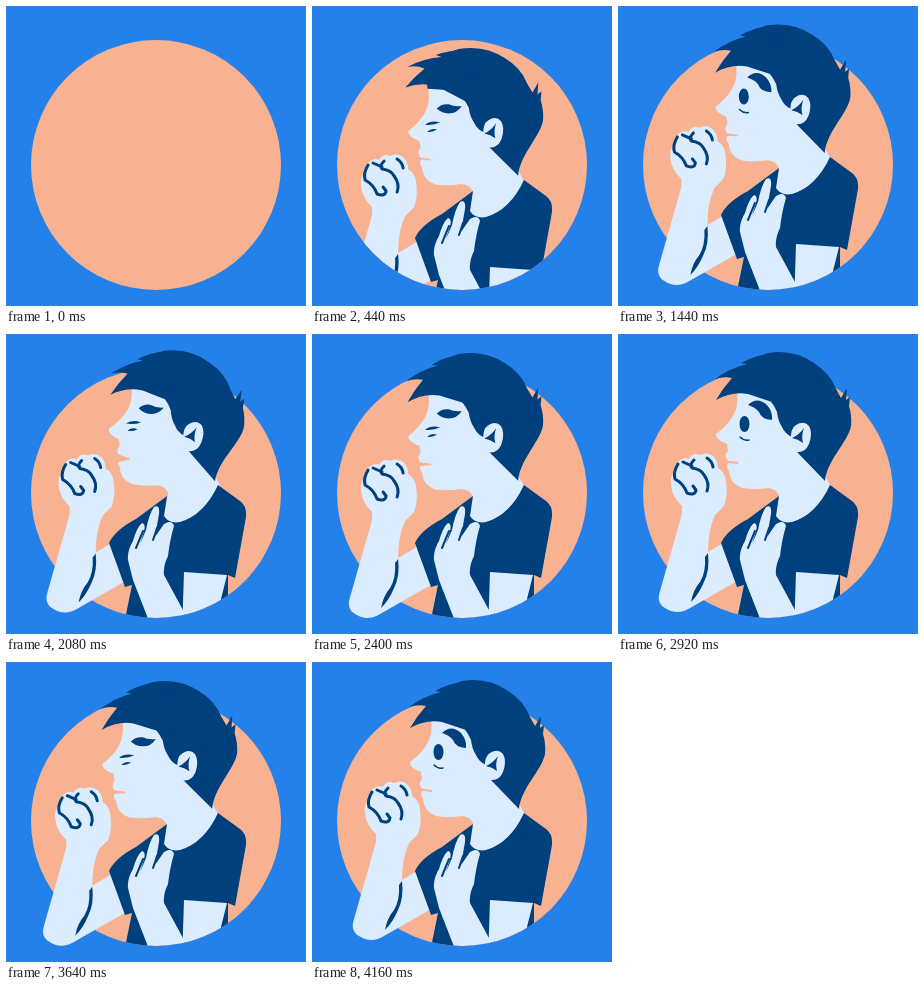
An HTML page for the animation above (4520 ms loop, 300x300 px).

```html
<!DOCTYPE html>
<html lang="en">
<head>
<meta charset="utf-8">
<title>Coughing boy</title>
<style>
  html, body { margin: 0; width: 100%; height: 100%; overflow: hidden; background: #2581ea; }
  svg { display: block; width: 100vw; height: 100vh; }
  .skin { fill: #dbecff; }
  .navy { fill: #00407d; }
  .peach { fill: #f8b292; }
  .line { fill: none; stroke: #00407d; stroke-linecap: round; stroke-linejoin: round; }
</style>
</head>
<body>
<svg viewBox="0 0 300 300">
  <defs>
    <clipPath id="disc"><path d="M0 0H300V159H275A125 125 0 0 1 25 159H0Z"/></clipPath>
    <clipPath id="armClip"><circle id="reach" cx="150" cy="159" r="125"/></clipPath>
  </defs>
  <circle class="peach" cx="150" cy="159" r="125"/>

  <g id="figure">
    <g clip-path="url(#disc)"><g class="rise">
      <g id="head">
        <path class="skin" d="M119 57Q121 72 115 82Q109 92 98 100Q98 106 109 110L110 117Q105 122 111 128Q107 132 111 137Q112 150 124 154Q137 156 150 154Q158 155 161 161L156 195H205L212 151L185 100L160 58Z"/>
        <path id="mouth" class="peach"/>
        <path d="M108 127.500L120 129" fill="none" stroke="#f8b292" stroke-width="1.800"/>
        <g id="openEye">
          <ellipse class="navy" cx="126.500" cy="90" rx="5" ry="8"/>
          <path class="navy" d="M130 71Q139 62 149 71Q155 78 154 86Q143 85 141 78Q137 73 130 71Z"/>
          <path class="line" d="M122 103Q126 107 131 106" stroke-width="1.500"/>
        </g>
        <g id="shutEye">
          <path class="navy" d="M127 78Q132 73 139 74Q145 77 152 76Q147 84 137 83Q131 82 127 78Z"/>
          <path class="navy" d="M115 94Q121 89 130 92Q123 95 115 94Z"/>
          <path class="navy" d="M117 101Q121 97 127 99Q122 102 117 101Z"/>
        </g>
        <path class="navy" d="M118 50Q121 28 150 19Q176 15 196 29Q212 39 218 55L223 64L229 54L228 66L232 63L231 72Q234 82 233 92C230 108 209 126 207 147L179 118L174 103Q167 100 164 93Q160 87 159 78Q153 64 143 60L118 58Z"/>
        <path class="skin" d="M173 108Q172 94 178 91Q186 86 191 92Q195 99 191 110Q187 119 179 118L173 115Z"/>
        <path class="navy" d="M174 104Q181 101 186 94Q183 102 185 109Q180 105 174 104Z"/>
        <path id="fringe" class="navy" d="M160 20Q140 19 123 29L129 30Q112 34 97 45Q106 42 114 44Q105 54 98 66Q114 57 130 60L160 70Z"/>
      </g>
    </g></g>

    <g clip-path="url(#armClip)"><g class="rise"><g id="arm">
      <path class="skin" d="M53 151Q52 142 56 139Q57 128 64 125Q68 123 71 125Q75 118 82 121Q90 117 96 123Q100 127 100 134Q107 138 108 147Q110 162 106 172L97 181Q90 196 90 218L112 205L128 242L72 274Q59 282 47 274Q38 269 42 257L64 180L64 172Q54 163 53 151Z"/>
      <path class="line" d="M60 130Q55 138 57 145Q66 150 69 159Q77 162 78 156L75 152M76 126Q71 131 74 134Q83 135 86 141Q92 149 89 157M89 124Q94 127 95 133M65 128L74 132" stroke-width="3"/>
      <path class="navy" d="M90 219Q92 236 86 248Q81 260 73 268Q75 256 82 248Q88 238 87 223Z"/>
    </g></g></g>

    <g clip-path="url(#disc)"><g class="rise">
      <path class="navy" d="M161 162L158 182Q163 190 174 188Q198 181 212 151L234 167Q241 172 240 183L229 244L222 241V300H116L126 251L119 253L103 209Q109 196 130 185Z"/>
      <path class="skin" d="M178 238L221 241L215 265V300H176Z"/>
      <path class="skin" d="M122 226Q121 217 127 207Q131 193 136 189Q140 190 138 197L134 210L140 196Q143 180 148 173Q154 170 153 180L149 203L158 190Q166 185 168 192Q164 205 162 222Q157 232 158 241L178 278V300H148L127 246Z"/>
      <path class="line" d="M137 197L130 214M151 194L147 206" stroke-width="2"/>
    </g></g>
  </g>
</svg>
<script>
const LOOP = 4520, FIRST = 880, PERIOD = 1200;
const $ = id => document.getElementById(id);
const clamp = (x, a = 0, b = 1) => Math.min(b, Math.max(a, x));

// Eased value at time t between [time, value] keys
function track(keys, t) {
  const i = keys.findIndex(k => k[0] > t);
  if (i === 0) return keys[0][1];
  if (i < 0) return keys[keys.length - 1][1];
  const [a, va] = keys[i - 1], [b, vb] = keys[i];
  const p = (t - a) / (b - a);
  return va + (vb - va) * p * p * (3 - 2 * p);
}

// One cough, timed from the moment the head is fully back
const tilt = [[-360, 0], [-100, 3], [60, 3], [160, -2.5], [320, -1.2], [720, 0]];
const drop = [[-360, 0], [-60, 0], [60, 1], [160, 12], [320, 6], [640, 0]];
const gape = [[-360, .3], [-100, 1], [60, 1], [160, .8], [320, .5], [640, .3]];

// The figure comes up at the end of one cough, then coughs three more times
function coughTime(t) {
  if (t < 600) return t - 120;
  const n = clamp(Math.floor((t - FIRST + 360) / PERIOD), 0, 2);
  return t - FIRST - n * PERIOD;
}

function draw(t) {
  const phase = coughTime(t);
  const rise = 207 * (1 - clamp((t - 40) / 600)) ** 2;
  const turn = track(tilt, phase), down = track(drop, phase);
  const open = track(gape, phase) * clamp((t - 560) / 160) * (1 - clamp((t - 4000) / 160));
  const shut = phase > -220 && phase < 480;

  $('figure').style.display = t < 40 ? 'none' : '';
  document.querySelectorAll('.rise').forEach(g => g.setAttribute('transform', `translate(0 ${rise})`));
  $('reach').setAttribute('r', 125 + 60 * clamp((t - 440) / 120));
  $('head').setAttribute('transform', `translate(${turn * .7} 0) rotate(${turn} 200 145)`);
  $('fringe').setAttribute('transform', `rotate(${Math.min(rise, 30) * .45} 150 50)`);
  $('arm').setAttribute('transform', `translate(${-.65 * down} ${down})`);
  $('mouth').setAttribute('d', `M103 ${127 - 4 * open}L122 129L103 ${127 + 8 * open}Z`);
  $('openEye').style.display = shut ? 'none' : '';
  $('shutEye').style.display = shut ? '' : 'none';
}

const start = performance.now();
function tick() {
  const t = (performance.now() - start) % LOOP;
  draw(Math.floor(t / 40) * 40);
  requestAnimationFrame(tick);
}
tick();
</script>
</body>
</html>
```
